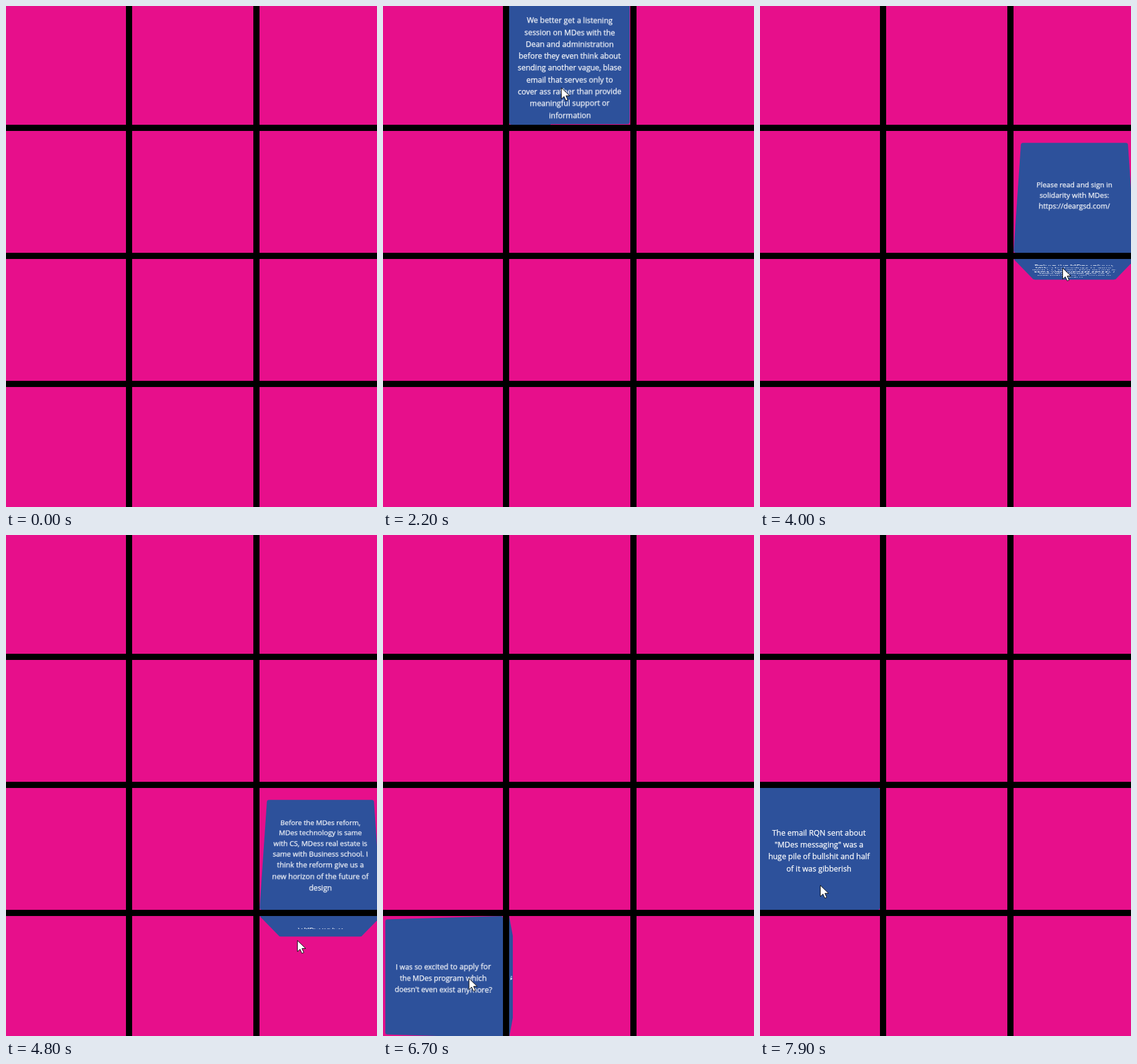
These frames come from a looping animation (600 px wide and 810 px high, 8 s). An HTML page:

```html
<!DOCTYPE html>
<html lang="en">
<head>
<meta charset="utf-8">
<title>Flip grid</title>
<style>
  html, body { margin: 0; width: 100%; height: 100%; overflow: hidden; background: #000; }
  #stage { position: relative; width: 600px; height: 810px; overflow: hidden; }
  .cell { position: absolute; width: 196.8px; height: 196.8px; overflow: hidden; background: #e70f8b; perspective: 400px; }
  .card {
    position: absolute; inset: 0; border-radius: 4px; background: #2d519b; color: #fff;
    font: 12.4px/19.3px "Open Sans", "Noto Sans", sans-serif;
    text-align: center; white-space: pre; -webkit-text-stroke: .25px #fff;
  }
  .card span { position: absolute; left: 50%; transform: translateX(-50%); }
  #cursor { position: absolute; left: 0; top: 0; overflow: visible; }
</style>
</head>
<body>
<div id="stage"></div>
<script>
const LOOP = 8000, FLIP = 300, MOVE = 900;
const GAP = 38;                       // time the pointer spends between two cells
const CELL = 196.8, PITCH_X = 206.6, PITCH_Y = 206.9, LEFT = -3, TOP = -4.8;
const LINE_SHARE = 17.8;              // height each line counts for when centring
const stage = document.getElementById('stage');

const listening = `We better get a listening
session on MDes with the
Dean and administration
before they even think about
sending another vague, blase
email that serves only to
cover ass rather than provide
meaningful support or
information`;

// Each stop of the pointer: time it enters the cell, resting point, text of the card
const stops = [
  [100, 300, 570, 'What happens to\nthe students?'],
  [450, 300, 300, 'We would like to\nbe part of this'],
  [830, 300, 110, listening],
  [1250, 100, 110, 'Why were we not\nasked about MDes?'],
  [1955, 315, 135, listening],
  [2610, 500, 130, 'Please talk to us\nbefore you decide'],
  [3250, 488, 304, 'Please read and sign in\nsolidarity with MDes:\nhttps://deargsd.com/'],
  [3998, 490, 540, `Before the MDes reform,
MDes technology is same
with CS, MDess real estate is
same with Business school. I
think the reform give us a
new horizon of the future of
design`],
  [4798, 452, 768, 'Is MDes useless'],
  [5508, 296, 701, 'What is MDes?'],
  [6501, 102, 720, 'I was so excited to apply for\nthe MDes program which\ndoesn\'t even exist anymore?'],
  [7510, 97, 564, `The email RQN sent about
"MDes messaging" was a
huge pile of bullshit and half
of it was gibberish`]
].map(([enter, x, y, text]) => ({
  enter, x, y, text,
  col: Math.floor((x - LEFT) / PITCH_X),
  row: Math.floor((y - TOP) / PITCH_Y)
}));

function add(parent, className) {
  const el = document.createElement('div');
  el.className = className;
  return parent.appendChild(el);
}

const cells = Array.from({ length: 12 }, (_, i) => {
  const cell = add(stage, 'cell');
  cell.style.left = LEFT + PITCH_X * (i % 3) + 'px';
  cell.style.top = TOP + PITCH_Y * Math.floor(i / 3) + 'px';
  return cell;
});

const cards = stops.map((stop, i) => {
  const { col, row, enter, text } = stop;
  const el = add(cells[row * 3 + col], 'card');
  const label = el.appendChild(document.createElement('span'));
  label.textContent = text;
  label.style.top = (CELL - text.split('\n').length * LINE_SHARE) / 2 + 'px';
  const from = stops[i - 1] || { col, row: row + 1 };
  const to = stops[i + 1] || { col, row, enter: Infinity };
  return {
    el, enter, leave: to.enter - GAP,
    inSide: [from.col - col, from.row - row],
    outSide: [to.col - col, to.row - row]
  };
});

stage.insertAdjacentHTML('beforeend',
  `<svg id="cursor" width="14" height="22"><path d="M0.5 0.5V18.5L4.8 14.6L7.8 21.3L10.8 20L7.9 13.4H13.8Z"
    fill="#fff" stroke="#111"/></svg>`);
const cursor = document.getElementById('cursor');

const clamp = x => Math.min(1, Math.max(0, x));
const smooth = x => x * x * (3 - 2 * x);

// cubic-bezier(.25, .1, .25, 1), the CSS "ease" curve
function ease(x) {
  const bez = (a, b, s) => 3 * a * s * (1 - s) ** 2 + 3 * b * s * s * (1 - s) + s ** 3;
  let lo = 0, hi = 1;
  for (let i = 0; i < 20; i++) {
    const mid = (lo + hi) / 2;
    if (bez(.25, .25, mid) < x) lo = mid; else hi = mid;
  }
  return bez(.1, 1, lo);
}

// A card swings in on the edge the pointer crosses and out on the edge it leaves by
function drawCard({ el, enter, leave, inSide, outSide }, t) {
  const shown = t >= enter && t < leave + FLIP;
  el.style.display = shown ? '' : 'none';
  if (!shown) return;
  const leaving = t >= leave;
  const [x, y] = leaving ? outSide : inSide;
  const k = ease(clamp((t - (leaving ? leave : enter)) / FLIP));
  const angle = leaving ? 104 * k : 90 * (1 - k);
  el.style.transformOrigin = `${50 + 50 * x}% ${50 + 50 * y}%`;
  el.style.transform = angle > .05 ? `rotate3d(${y}, ${-x}, 0, ${angle}deg)` : 'none';
}

// The pointer glides from stop to stop, halfway there when it enters the cell
function drawCursor(t) {
  let { x, y, enter } = stops[0];
  for (let i = 1; i < stops.length; i++) {
    const a = stops[i - 1], b = stops[i];
    const k = smooth(clamp((t - b.enter) / MOVE + .5));
    x += (b.x - a.x) * k;
    y += (b.y - a.y) * k;
  }
  cursor.style.display = t < enter ? 'none' : '';
  cursor.style.transform = `translate(${x}px, ${y}px)`;
}

function frame() {
  const t = performance.now() % LOOP;
  cards.forEach(card => drawCard(card, t));
  drawCursor(t);
  requestAnimationFrame(frame);
}
frame();
</script>
</body>
</html>
```
